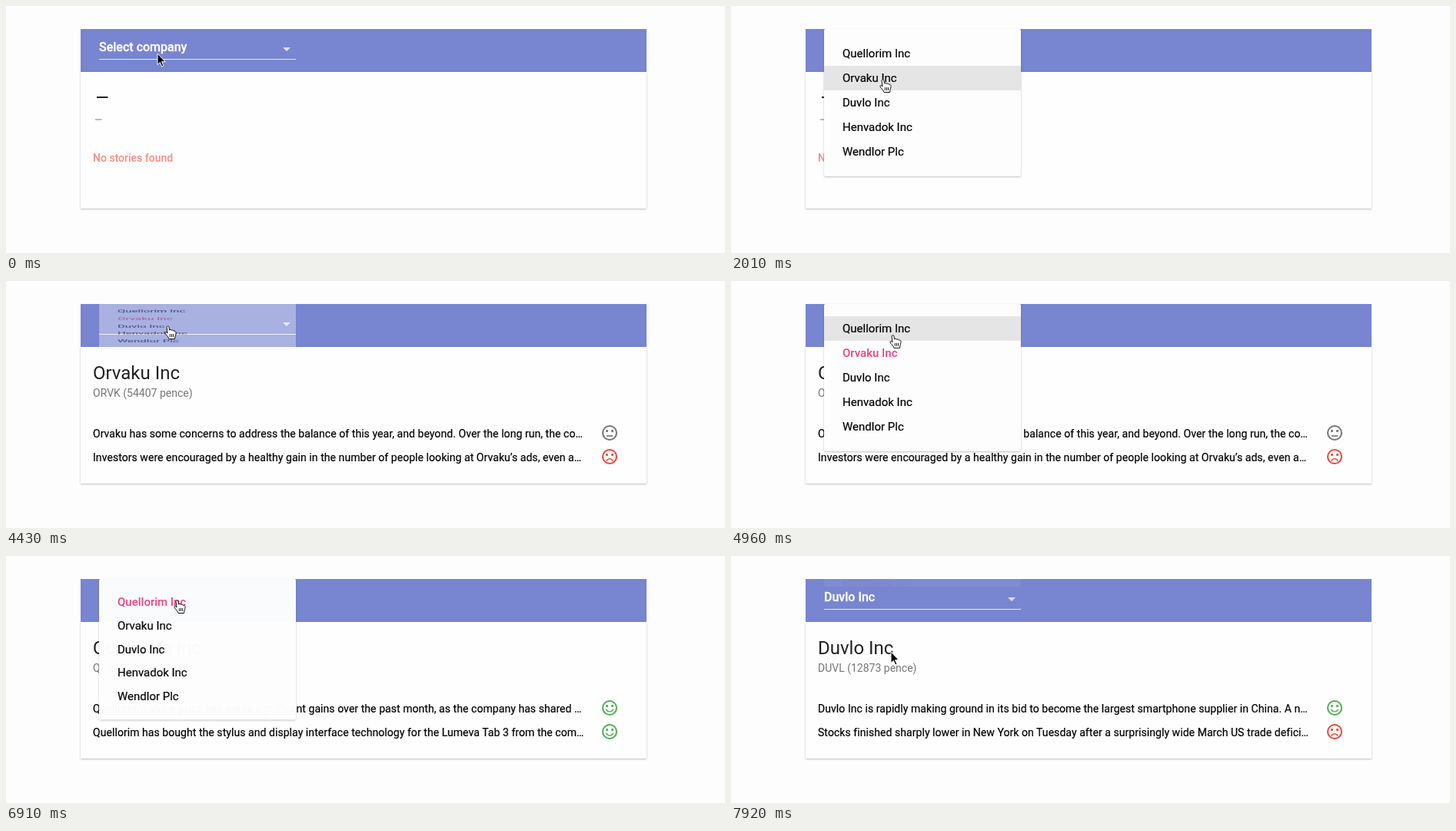
Recreate the animation shown at these times as an HTML page. Size 935 px wide and 322 px high, loop 8 s.

```html
<!DOCTYPE html>
<html lang="en">
<head>
<meta charset="utf-8">
<title>Company stories</title>
<style>
  html, body { margin: 0; width: 100%; height: 100%; overflow: hidden; background: #fdfdfd; }
  svg { display: block; font: 14px Roboto, sans-serif; }
  .shadow { filter: drop-shadow(0 1px 1.3px rgba(0, 0, 0, .25)); }
  .label { font-size: 16px; font-weight: 500; fill: #fff; stroke: #fff; stroke-width: .3px; }
  .title { font-size: 24px; fill: #212121; }
  .quote { fill: #757575; }
  .story { letter-spacing: .06px; stroke: #000; stroke-width: .2px; }
  .empty { font-weight: 500; fill: #f98b7e; }
  .item { font-size: 15px; stroke: #000; stroke-width: .2px; }
  .selected { font-weight: 500; fill: #f0407f; stroke: none; }
  .face { fill: none; stroke-width: 2; }
</style>
</head>
<body>
<svg width="935" height="322" viewBox="0 0 935 322">
  <rect x="97" y="30" width="736" height="56" fill="#7885d0"/>
  <rect class="shadow" x="97" y="86" width="736" height="178" fill="#fefefe"/>
  <text id="prompt" class="label" x="121" y="59">Select company</text>
  <text id="label" class="label" x="121" y="59"></text>
  <path d="M121 69h256v1h-256z" fill="#fff" opacity=".85"/>
  <path d="M360 54h10l-5 5z" fill="#fff" opacity=".75"/>
  <g id="content"></g>
  <g id="menu">
    <rect class="shadow" width="256" height="192" rx="2" fill="#fdfdfd"/>
    <rect id="hover" width="256" height="32" fill="#e5e5e5"/>
    <g id="items"></g>
  </g>
  <g id="cursor" stroke-linejoin="round">
    <path id="arrow" d="M0 0V14.5L3.3 11.4 5.7 17 7.9 16 5.5 10.6H10.1Z" stroke="#fff"/>
    <g id="hand" fill="#fff" stroke="#111">
      <path d="M-2 1.2C-2-.6 1-.6 1 1.2L1.5 5C2 4 4.3 4 4.5 5.5 5.5 4.7 7 5 7.3 6.3 8.5 5.8 10.2 6.5 10 8.5 10 11 9 12 8.5 16.5H1C0 13-3.5 11-4 8.8-4.3 7-2.3 7-1 9Z"/>
      <path d="M2.3 10v4M4.5 10v4M6.7 10v4" fill="none"/>
    </g>
  </g>
</svg>
<script>
const LOOP = 8000, OPEN_MS = 300, FADE_IN_MS = 265, CLOSE_MS = 250;
const GREEN = '#4caf50', GREY = '#757575', RED = '#f44336';
const MOUTHS = {
  [GREEN]: 'M-5 2Q0 8 5 2',
  [GREY]: 'M-4 4H4',
  [RED]: 'M-4.5 5.5Q0 0 4.5 5.5'
};

const companies = [
  { name: 'Quellorim Inc', quote: 'QLRM (4887 pence)', stories: [
    [GREEN, 'Quellorim’s share price has made significant gains over the past month, as the company has shared …'],
    [GREEN, 'Quellorim has bought the stylus and display interface technology for the Lumeva Tab 3 from the com…']] },
  { name: 'Orvaku Inc', quote: 'ORVK (54407 pence)', stories: [
    [GREY, 'Orvaku has some concerns to address the balance of this year, and beyond. Over the long run, the co…'],
    [RED, 'Investors were encouraged by a healthy gain in the number of people looking at Orvaku’s ads, even a…']] },
  { name: 'Duvlo Inc', quote: 'DUVL (12873 pence)', stories: [
    [GREEN, 'Duvlo Inc is rapidly making ground in its bid to become the largest smartphone supplier in China. A n…'],
    [RED, 'Stocks finished sharply lower in New York on Tuesday after a surprisingly wide March US trade defici…']] },
  { name: 'Henvadok Inc' },
  { name: 'Wendlor Plc' }
];

// One entry per use of the menu; all times in ms.
const visits = [
  { hand: 380, open: 790, hover: 1150, close: 2640, load: 2720, icons: 3000, pick: 1 },
  { hand: 3900, open: 4370, hover: 4750, close: 5529, load: 5600, icons: 5600, pick: 0 },
  { hand: 6100, open: 6690, hover: 7050, close: 7742, load: 7790, icons: 7790, pick: 2 }
];

// time, x, y of the pointer's hot spot
const track = [
  [0, 197, 62], [280, 197, 62], [470, 211, 59], [1150, 211, 59], [1610, 199, 87],
  [2010, 198, 96], [3560, 198, 96], [4070, 211, 59], [4700, 211, 59], [5020, 211, 72],
  [5180, 211, 72], [5260, 211, 67], [6000, 211, 67], [6490, 223, 58], [7000, 223, 58],
  [7380, 208, 125], [LOOP, 208, 125]
];

const $ = id => document.getElementById(id);
const clamp = x => Math.min(1, Math.max(0, x));
const show = (id, opacity) => $(id).setAttribute('opacity', Number(opacity));
const text = (cls, x, y, s) => `<text class="${cls}" x="${x}" y="${y}">${s}</text>`;

// The standard CSS "ease" curve, cubic-bezier(.25, .1, .25, 1).
function ease(x) {
  if (x <= 0 || x >= 1) return clamp(x);
  const bezier = (a, b, u) => 3 * a * u * (1 - u) ** 2 + 3 * b * u * u * (1 - u) + u ** 3;
  let lo = 0, hi = 1;
  for (let i = 0; i < 20; i++) {
    const mid = (lo + hi) / 2;
    if (bezier(.25, .25, mid) < x) lo = mid; else hi = mid;
  }
  return bezier(.1, 1, lo);
}

function pointerAt(t) {
  const i = track.findIndex(key => key[0] > t);
  const [t0, x0, y0] = track[i - 1], [t1, x1, y1] = track[i];
  const u = (t - t0) / (t1 - t0), s = u * u * (3 - 2 * u);
  return [x0 + (x1 - x0) * s, y0 + (y1 - y0) * s];
}

const face = (color, y) => `<g class="face" transform="translate(785 ${y})" stroke="${color}">
  <circle r="9"/><path d="${MOUTHS[color]}" stroke-width="1.7"/>
  <path d="M-3.5-4v3M3.5-4v3" stroke-width="2.6"/></g>`;

function contentFor(company, icons) {
  if (!company) {
    return '<path d="M118 118h14.5v2h-14.5z" fill="#212121"/><path d="M116 147.5h8.5v1h-8.5z" fill="#757575"/>' +
      text('empty', 113, 203, 'No stories found');
  }
  const stories = company.stories.map(([color, story], i) => icons
    ? text('story', 113, 204 + 31 * i, story) + face(color, 198 + 31 * i)
    : text('story', 113, 200 + 28 * i, story));
  return text('title', 113, 128, company.name) + text('quote', 113, 151, company.quote) + stories.join('');
}

const drawn = {};
function fill(id, html) {
  if (drawn[id] !== html) $(id).innerHTML = drawn[id] = html;
}

function render(t) {
  const last = key => visits.filter(v => t >= v[key]).pop();
  const closed = last('close'), loaded = last('load');
  const active = visits.find(v => t >= v.open && t < v.close);
  const picked = closed ? closed.pick : -1;
  const [x, y] = pointerAt(t);

  fill('content', contentFor(loaded && companies[loaded.pick], loaded && t >= loaded.icons));
  fill('label', closed ? companies[picked].name : '');
  show('label', !active);
  show('prompt', closed ? 1 - clamp((t - 2830) / 200) : !active);

  const closing = closed ? 1 - ease((t - closed.close) / CLOSE_MS) : 0;
  const size = active ? ease((t - active.open) / OPEN_MS) : closing;
  $('menu').setAttribute('transform', `translate(121 30) scale(1 ${size})`);
  show('menu', active ? ease((t - active.open) / FADE_IN_MS) : closing);
  fill('items', companies.map((c, i) =>
    text(i === picked ? 'item selected' : 'item', 24, 37 + 32 * i, c.name)).join(''));
  $('hover').setAttribute('y', 16 + 32 * Math.floor((y - 46) / 32));
  show('hover', active && t >= active.hover ? 1 : 0);

  const hand = visits.some(v => t >= v.hand && t < v.close);
  $('cursor').setAttribute('transform', `translate(${x} ${y})`);
  show('hand', hand);
  show('arrow', !hand);
}

function tick() {
  render(performance.now() % LOOP);
  requestAnimationFrame(tick);
}
tick();
</script>
</body>
</html>
```
